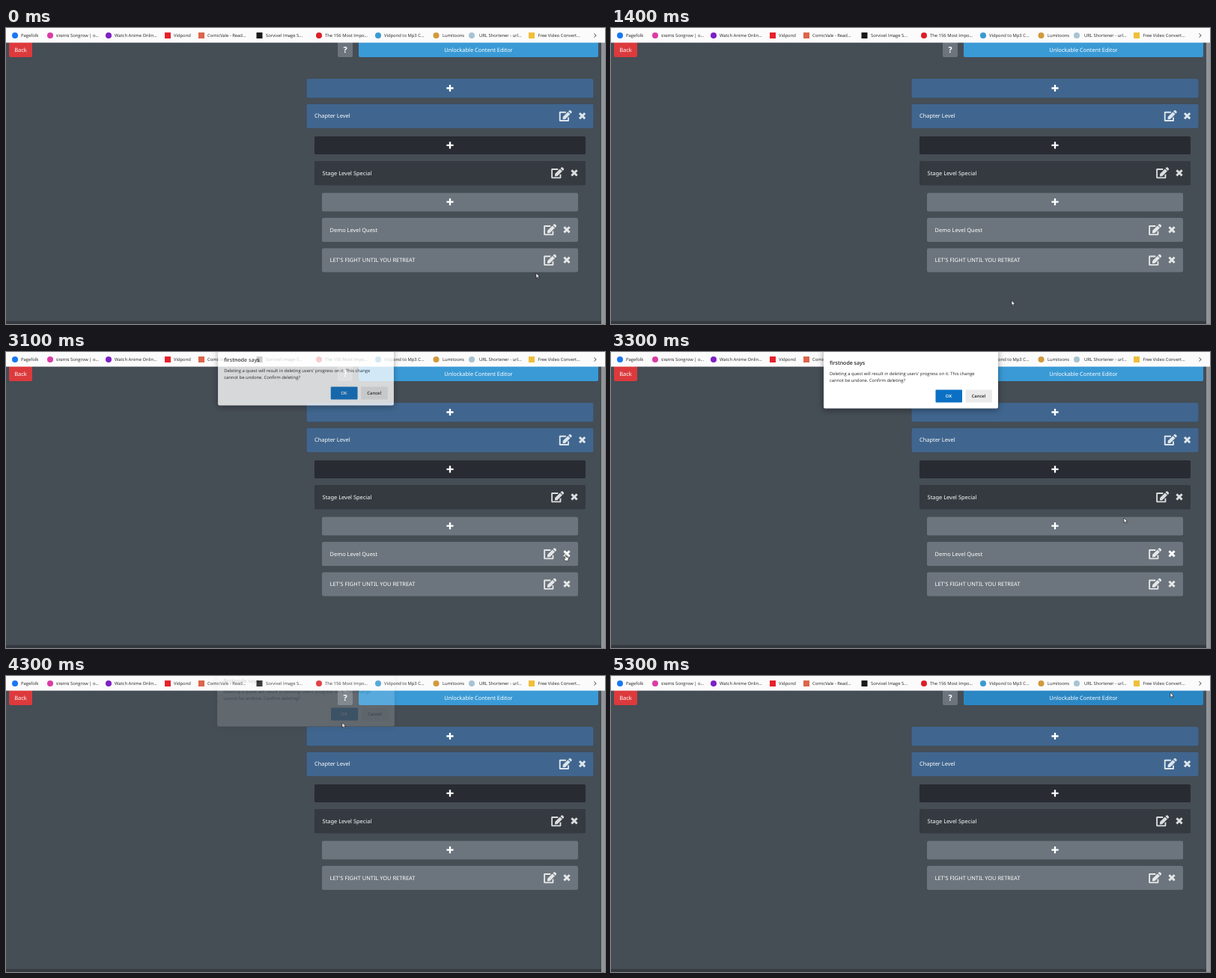
Animation, 800 px wide and 396 px high, one loop 5400 ms. Source, as an HTML page:

```html
<!DOCTYPE html>
<html lang="en">
<head>
<meta charset="utf-8">
<title>Content editor</title>
<style>
  html, body { margin: 0; width: 100%; height: 100%; overflow: hidden; background: #454d55; }
  svg { display: block; width: 800px; height: 396px; cursor: default; }
  text { text-rendering: geometricPrecision; font: 7.43px "Noto Sans", sans-serif; fill: #fff; white-space: pre; }
  .ui { font: 5.85px "Open Sans", "Noto Sans", "Noto Sans Thai", sans-serif; fill: #222; }
  .mid { text-anchor: middle; }
  .card { filter: drop-shadow(0 .6px .6px rgba(0, 0, 0, .28)); }
  .icon { opacity: .83; }
  .icon.hot { opacity: 1; }
  #dialog { filter: drop-shadow(0 2px 4px rgba(0, 0, 0, .4)); }
</style>
</head>
<body>
<svg id="stage" viewBox="0 0 800 396">
  <defs>
    <g id="edit" transform="scale(.0295)">
      <path d="M310 96H42q-10 0-10 10V470q0 10 10 10H406q10 0 10-10V322" fill="none" stroke="#fff" stroke-width="64"/>
      <path d="M396 77L500 180 274 406 160 416 170 302ZM419 54L460 12q28-22 56 0l49 49q22 28 0 56l-42 42Z" fill="#fff"/>
    </g>
    <path id="cross" d="M-3.6-3.6L3.6 3.6M3.6-3.6L-3.6 3.6" stroke="#fff" stroke-width="3"/>
    <path id="plus" d="M-4.6 0H4.6M0-4.6V4.6" stroke="#fff" stroke-width="2.3"/>
  </defs>
  <rect width="800" height="396" fill="#454d55"/>
  <rect y="392" width="795" height="4" fill="#343a40"/>
  <rect x="795" y="19" width="5" height="377" fill="#919498"/>
  <g id="page"></g>
  <g id="bar"></g>
  <g id="dialog">
    <rect x="284" y="-6" width="233" height="81.5" rx="2" fill="#fff"/>
    <text class="ui" x="292" y="16.6" style="font-size:7px;font-weight:600">firstnode says</text>
    <text class="ui" x="292" y="31.4">Deleting a quest will result in deleting users' progress on it. This change</text>
    <text class="ui" x="292" y="40.4">cannot be undone. Confirm deleting?</text>
    <rect x="433.5" y="50.5" width="35.5" height="17" rx="1" fill="#0b70c4"/>
    <rect x="473.5" y="50.5" width="35.5" height="17" rx="1" fill="#ebebeb"/>
    <text class="ui mid" x="451" y="61" style="fill:#fff;font-weight:600">OK</text>
    <text class="ui mid" x="491" y="61" style="font-weight:600">Cancel</text>
  </g>
  <g id="pointer" fill="#fff" stroke="#111" stroke-width=".6" stroke-linejoin="round">
    <path id="arrow" d="M0 0V6.6L1.5 5.2 2.5 7.4 3.6 7 2.6 4.8H4.7Z"/>
    <path id="hand" d="M-.7.6Q0-.5.7.6V3.1L3.2 3.7Q4 4 3.8 5L3.1 8.4H-.6L-2.6 5.6Q-2.7 4.6-1.7 4.8L-.7 5.6Z"/>
  </g>
</svg>
<script>
const $ = id => document.getElementById(id);
const LOOP = 5400, OPEN = 3100, CLOSE = 4300;

const box = (x, y, w, h, fill, extra = '') =>
  `<rect x="${x}" y="${y}" width="${w}" height="${h}" rx="2" fill="${fill}" ${extra}/>`;

const icon = (name, x, y, cx) =>
  `<use class="icon" href="#${name}" x="0" y="0" transform="translate(${x} ${y})" data-x="${cx}" data-y="${y + (name === 'edit' ? 7.5 : 0)}"/>`;

const adder = (x, y, h, fill) =>
  box(x, y, 2 * (593 - x), h, fill, 'class="card"') +
  `<use href="#plus" transform="translate(593 ${y + h / 2 - .2})"/>`;

function card(x, y, fill, title, id = '') {
  const right = 1186 - x, mid = y + 16;
  return `<g id="${id}">` + box(x, y, right - x, 32.2, fill, 'class="card"') +
    `<text x="${x + 10.6}" y="${mid + 2.6}">${title}</text>` +
    icon('edit', right - 45.8, mid - 7.8, right - 37) +
    icon('cross', right - 15, mid - .1, right - 15) + '</g>';
}

$('page').innerHTML =
  box(4, 16, 31, 23, '#dc3a3c') + '<text class="mid" x="19.4" y="32.4">Back</text>' +
  box(443, 16, 20, 23, '#6c757d') +
  '<text class="mid" x="453" y="33.4" style="font-size:11px;font-weight:900">?</text>' +
  box(471, 16, 320, 23, '#3a9ad6', 'id="header"') +
  '<text class="mid" x="631" y="32.4">Unlockable Content Editor</text>' +
  adder(401.4, 68, 25.4, '#40668f') +
  card(401.4, 101.7, '#40668f', 'Chapter Level', 'chapter') +
  adder(412, 145, 24, '#282b32') +
  card(412, 178, '#343a40', 'Stage Level Special', 'special') +
  adder(422, 220.4, 25, '#6c757d') +
  card(422, 254, '#6c757d', 'Demo Level Quest', 'demo') +
  card(422, 294.5, '#6c757d', "LET'S FIGHT UNTIL YOU RETREAT", 'fight');

// icon centre, text start, label, icon colour, square?
const links = [
  [12, 20, 'Pagefolk', '#1877f2'],
  [59, 67, 'รายการ Songrow | o...', '#dc3ba5'],
  [137, 145, 'Watch Anime Onlin...', '#7d1fc4'],
  [216, 224, 'Vidpond', '#e8202a', 1],
  [261, 269, 'ComicVale - Read...', '#dc6549', 1],
  [338.5, 347, 'Sorvixel Image S...', '#1a1a1a', 1],
  [418, 426, 'The 156 Most Impo...', '#dc1f26'],
  [497, 505, 'Vidpond to Mp3 C...', '#3b9ad0'],
  [574.5, 583, 'Lumitoons', '#d19a3c'],
  [622, 632, 'URL Shortener - url...', '#a9c3d2'],
  [702, 710.5, 'Free Video Convert...', '#f0bf3a', 1],
];
$('bar').innerHTML = '<rect width="800" height="19.6" fill="#fbfbfc"/>' +
  links.map(([cx, x, label, fill, square]) =>
    `<rect x="${cx - 4}" y="6" width="8" height="8" rx="${square ? 0 : 4}" fill="${fill}"/>` +
    `<text class="ui" x="${x}" y="12.4">${label}</text>`).join('') +
  '<path d="M785.5 7.4l2.7 2.6-2.7 2.6" fill="none" stroke="#333" stroke-width=".9"/>';

// time, x, y of the pointer
const track = [
  [0, 708, 328], [300, 668, 352], [600, 600, 366], [900, 550, 368], [1200, 535, 364.5],
  [1900, 535, 364.5], [2200, 620, 345], [2500, 734, 301], [2600, 739.5, 295],
  [2900, 747.5, 271], [3100, 747.5, 271], [3300, 685, 222], [3500, 525, 105],
  [3700, 452, 65], [3800, 451, 63.5], [4300, 449, 62.5], [4600, 555, 50],
  [4900, 690, 31], [5200, 747, 22], [5400, 747, 22],
];
function pointerAt(t) {
  const i = track.findIndex(p => p[0] > t);
  const [t0, x0, y0] = track[i - 1], [t1, x1, y1] = track[i];
  const k = (t - t0) / (t1 - t0);
  return [x0 + (x1 - x0) * k, y0 + (y1 - y0) * k];
}

const show = (id, on) => $(id).style.display = on ? '' : 'none';
const icons = [...document.querySelectorAll('.icon')];

function draw(t) {
  const [x, y] = pointerAt(t);
  const modal = t >= OPEN && t < CLOSE;
  // The page keeps its hover state while the dialog has the focus
  const [hx, hy] = modal ? pointerAt(OPEN) : [x, y];
  for (const el of icons) {
    const hot = Math.abs(el.dataset.x - hx) < 7 && Math.abs(el.dataset.y - hy) < 8;
    el.classList.toggle('hot', hot);
  }
  const onHeader = !modal && x > 471 && x < 791 && y > 20 && y < 39;
  $('header').setAttribute('fill', onHeader ? '#2b87c4' : '#3a9ad6');

  show('demo', t < CLOSE);
  $('fight').setAttribute('transform', `translate(0 ${t < CLOSE ? 0 : -40.5})`);

  show('dialog', t >= OPEN && t < CLOSE + 100);
  const [alpha, lift, grow] = t >= CLOSE ? [.15, -8, 1.016] : t < OPEN + 100 ? [.78, -4, 1.008] : [1, 0, 1];
  $('dialog').setAttribute('opacity', alpha);
  $('dialog').setAttribute('transform', `translate(${400.5 * (1 - grow)} ${lift}) scale(${grow} 1)`);

  const onCross = Math.hypot(x - 749, y - 270) < 7;
  show('hand', onCross);
  show('arrow', !onCross);
  $('pointer').setAttribute('transform', `translate(${x} ${y})`);
}

const start = performance.now();
function tick() {
  const t = (performance.now() - start) % LOOP;
  draw(Math.floor(t / 100) * 100);
  requestAnimationFrame(tick);
}
tick();
</script>
</body>
</html>
```
